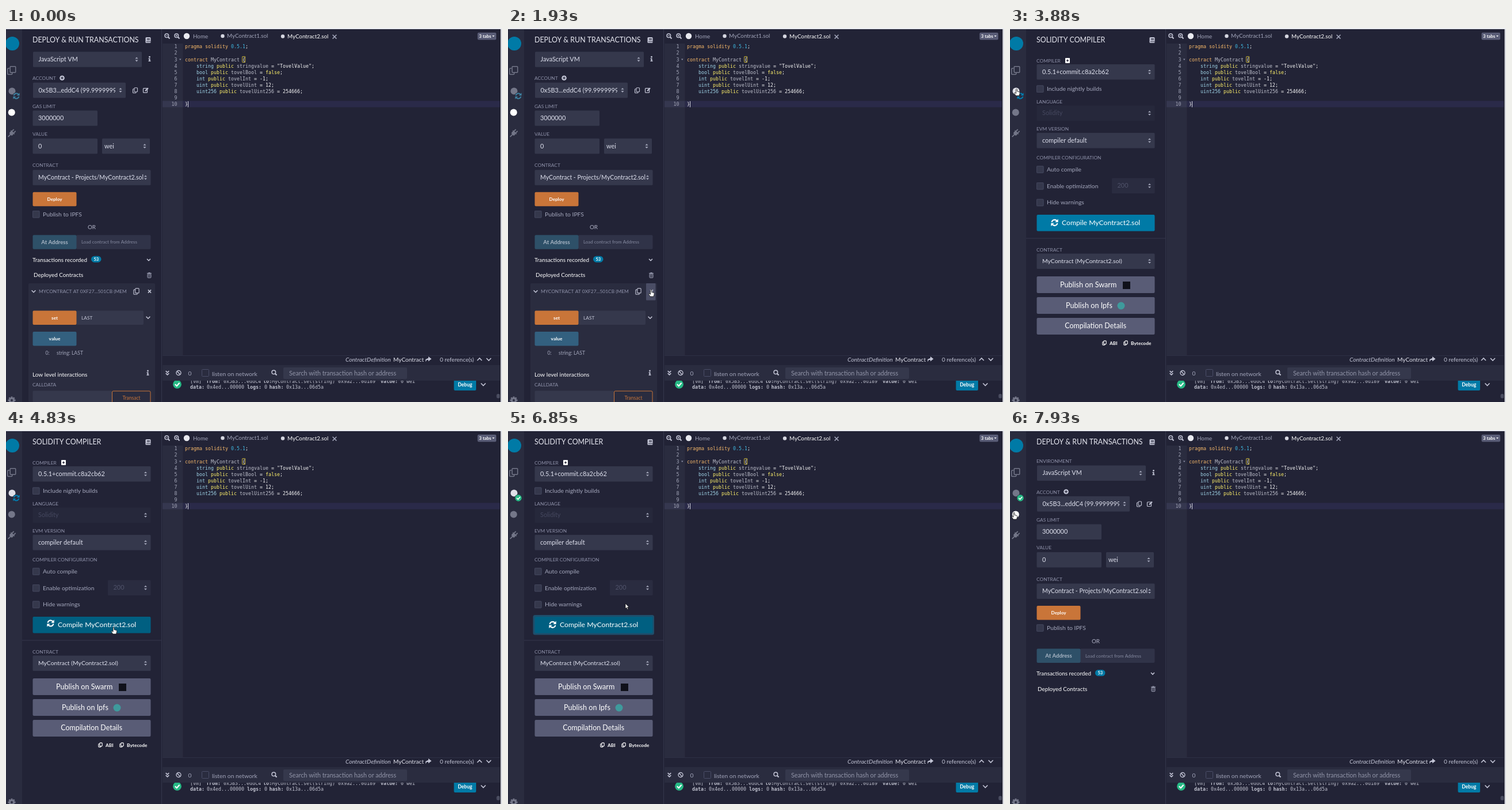
Write an HTML page with a canvas that moves like this. It is 862 px wide and 649 px high and loops after 8 s.

```html
<!DOCTYPE html>
<html lang="en">
<head>
<meta charset="utf-8">
<title>Contract IDE</title>
<style>
html, body { margin: 0; width: 100%; height: 100%; overflow: hidden; background: #222336; }
canvas { display: block; width: 862px; height: 649px; }
</style>
</head>
<body>
<canvas id="stage" width="862" height="649"></canvas>
<script>
const ctx = document.getElementById('stage').getContext('2d');
const LOOP = 8000;
const C = {
  body: '#222336', side: '#2a2c3f', input: '#35384c', dim: '#2a2c40', line: '#34364c',
  text: '#c3c5d6', label: '#8f92aa', soft: '#a2a5ba', white: '#ffffff', gray: '#747789',
  blue: '#007aa6', blueDark: '#005f81', steel: '#33607f', orange: '#c97539',
  violet: '#595c76', green: '#27b985'
};
const SANS = 'Lato, sans-serif';
const MONO = '"DejaVu Sans Mono", monospace';

function rect(x, y, w, h, color, r = 0) {
  ctx.fillStyle = color;
  ctx.beginPath();
  ctx.roundRect(x, y, w, h, r);
  ctx.fill();
}
function outline(x, y, w, h, color, r = 0, width = 1) {
  ctx.strokeStyle = color;
  ctx.lineWidth = width;
  ctx.beginPath();
  ctx.roundRect(x, y, w, h, r);
  ctx.stroke();
}
function disc(x, y, r, color) {
  ctx.fillStyle = color;
  ctx.beginPath();
  ctx.arc(x, y, r, 0, 7);
  ctx.fill();
}
function ring(x, y, r, color, width = 1.2) {
  ctx.strokeStyle = color;
  ctx.lineWidth = width;
  ctx.beginPath();
  ctx.arc(x, y, r, 0, 7);
  ctx.stroke();
}
function path(points, color, width = 1.3) {
  ctx.strokeStyle = color;
  ctx.lineWidth = width;
  ctx.beginPath();
  points.forEach(([x, y]) => ctx.lineTo(x, y));
  ctx.stroke();
}
function poly(points, color) {
  ctx.fillStyle = color;
  ctx.beginPath();
  points.forEach(([x, y]) => ctx.lineTo(x, y));
  ctx.fill();
}
// y is the vertical centre of the capitals
function text(str, x, y, size = 10.9, color = C.text, style = '', align = 'left', family = SANS) {
  ctx.font = `${style} ${size}px ${family}`;
  ctx.textAlign = align;
  ctx.fillStyle = color;
  ctx.fillText(str, x, y + size * 0.36);
}
const label = (str, y) => text(str, 46, y, 8.4, C.label);

function chevron(x, y, dir = 1, color = C.text, s = 3.4) {
  path([[x - s, y - dir * s / 2], [x, y + dir * s / 2], [x + s, y - dir * s / 2]], color, 1.6);
}
function cross(x, y, s = 2.6, color = C.text) {
  path([[x - s, y - s], [x + s, y + s]], color, 1.5);
  path([[x - s, y + s], [x + s, y - s]], color, 1.5);
}
function copyIcon(x, y, color = C.text, s = 1) {
  outline(x - 4 * s, y - 2.5 * s, 5.5 * s, 7 * s, color, 1, 1.1);
  rect(x - 1.8 * s, y - 5 * s, 6.4 * s, 8 * s, C.body);
  outline(x - 1.5 * s, y - 4.5 * s, 5.5 * s, 7 * s, color, 1, 1.1);
}
function infoIcon(x, y) {
  disc(x, y - 3.5, 1.4, C.text);
  rect(x - 1, y - 1, 2, 5, C.text);
  rect(x - 2, y - 1, 2, 1.3, C.text);
  rect(x - 2, y + 3, 4, 1.3, C.text);
}
function trashIcon(x, y, color) {
  rect(x - 4, y - 4, 8, 1.2, color);
  rect(x - 1.7, y - 5, 3.4, 1.2, color);
  outline(x - 3, y - 2.2, 6, 6.4, color, 1, 1);
  path([[x - 1, y - 1], [x - 1, y + 3]], color, 0.8);
  path([[x + 1, y - 1], [x + 1, y + 3]], color, 0.8);
}
function syncIcon(x, y, r, color) {
  ctx.save();
  ctx.translate(x, y);
  for (let i = 0; i < 2; i++) {
    ctx.strokeStyle = color;
    ctx.lineWidth = r * 0.36;
    ctx.beginPath();
    ctx.arc(0, 0, r * 0.8, Math.PI * 1.06, Math.PI * 1.8);
    ctx.stroke();
    poly([[r, -r], [r, -r * 0.12], [r * 0.12, -r * 0.12]], color);
    ctx.rotate(Math.PI);
  }
  ctx.restore();
}
function tick(x, y, r) {
  disc(x, y, r, C.green);
  path([[x - r * 0.5, y], [x - r * 0.1, y + r * 0.4], [x + r * 0.55, y - r * 0.35]], C.white, r * 0.28);
}
function arrows(x, y, color = '#a5a8bb') {
  poly([[x - 2.5, y - 1.2], [x + 2.5, y - 1.2], [x, y - 4]], color);
  poly([[x - 2.5, y + 1.2], [x + 2.5, y + 1.2], [x, y + 4]], color);
}
function field(x, y, w, str, opt = {}) {
  rect(x, y, w, 26.5, opt.bg || C.input, 1.5);
  ctx.save();
  ctx.beginPath();
  ctx.rect(x, y, (opt.clip || w), 27);
  ctx.clip();
  text(str, x + (opt.pad || 9.5), y + 13, opt.size || 10.9, opt.color || '#dfe1ee');
  ctx.restore();
  if (opt.select) arrows(x + w - 9, y + 13.2);
}
function checkbox(y, str) {
  rect(46, y - 6, 12.5, 12.5, C.input, 1);
  outline(46.5, y - 5.5, 11.5, 11.5, '#43465d', 1);
  text(str, 64, y, 10.3, '#a5a8bd');
}
function button(x, y, w, h, str, color, size, tone = C.white) {
  rect(x, y, w, h, color, 2);
  text(str, x + w / 2, y + h / 2, size, tone, 'bold', 'center');
}
function panelTitle(str) {
  text(str, 46, 21, 12.4, '#e6e7f0');
  rect(242.5, 16, 9, 10, C.text, 1.5);
  rect(245, 18, 5, 1, C.body);
  rect(245, 20, 5, 1, C.body);
  rect(244, 23.3, 7.5, 1, C.body);
}

function deployPanel(scrolled, closeHover) {
  panelTitle('DEPLOY & RUN TRANSACTIONS');
  ctx.save();
  ctx.beginPath();
  ctx.rect(28, 39, 242, 610);
  ctx.clip();
  if (scrolled) ctx.translate(0, -20.3);

  label('ENVIRONMENT', 53.5);
  field(47, 61.5, 189, 'JavaScript VM', { select: true });
  infoIcon(249.5, 74);
  label('ACCOUNT', 107.5);
  disc(97.5, 107, 4.3, C.text);
  path([[95, 107], [100, 107]], C.body, 1.2);
  path([[97.5, 104.5], [97.5, 109.5]], C.body, 1.2);
  field(47, 115, 161, '0x5B3...eddC4 (99.9999999', { select: true, clip: 143 });
  copyIcon(224.5, 128.5);
  outline(238.5, 125, 7, 7.5, C.text, 1, 1.2);
  path([[242, 129.5], [247, 124.5]], C.text, 2.2);
  label('GAS LIMIT', 156);
  field(46.5, 163.5, 112.5, '3000000');
  label('VALUE', 204);
  field(46.5, 212, 112.5, '0');
  field(167, 212, 83, 'wei', { select: true, pad: 4 });
  label('CONTRACT', 258.5);
  field(46.5, 266.5, 205, 'MyContract - Projects/MyContract2.sol', { select: true, clip: 194, size: 10.5 });
  button(46.5, 305, 76, 24.5, 'Deploy', C.orange, 8.1);
  checkbox(343.3, 'Publish to IPFS');
  text('OR', 149, 366, 9.9, '#b0b3c6', '', 'center');
  rect(122, 379.5, 129.5, 24.5, '#303348', 2);
  button(46.5, 379.5, 76, 24.5, 'At Address', '#2e5068', 9.5, '#a9b6c5');
  text('Load contract from Address', 131, 391.8, 8, '#858aa0');
  text('Transactions recorded', 46, 422.5, 9.9, C.white);
  rect(148, 416, 17.5, 11, C.blue, 5.5);
  text('53', 156.8, 421.7, 7.6, C.white, 'bold', 'center');
  chevron(248, 422.5, 1, C.text, 3);
  text('Deployed Contracts', 48, 449, 9.9, C.white);
  trashIcon(249, 449.5, C.soft);
  ctx.restore();
  if (scrolled) contractCard(closeHover);
}

function contractCard(closeHover) {
  rect(39, 443, 220, 206, C.side, 2);
  chevron(48, 457);
  text('MYCONTRACT AT 0XF27...501CB (MEM', 57, 457, 8.4, C.label);
  copyIcon(226.5, 457, C.text, 1.15);
  if (closeHover) rect(240, 443, 16.5, 29.5, '#4a4d65', 1);
  cross(249.5, 457);
  rect(122, 490.5, 117, 24.5, C.input, 2);
  button(46.5, 490.5, 76, 24.5, 'set', C.orange, 8.1);
  text('LAST', 131, 502.8, 8.3);
  chevron(247, 502.5);
  button(46.5, 527, 76, 24.5, 'value', C.steel, 8.4);
  text('0:', 68.5, 564.3, 8.6, C.soft);
  text('string: LAST', 88, 564.3, 8.7, C.soft);
  text('Low level interactions', 46, 601.3, 10, C.white);
  infoIcon(246.5, 598.5);
  label('CALLDATA', 619);
  rect(46.5, 629.5, 137.5, 20, C.input, 2);
  outline(184.5, 630, 66.5, 24, C.orange, 2);
  text('Transact', 218, 641.7, 8.5, C.orange, '', 'center');
}

function compilerPanel(hover, focus, spin) {
  panelTitle('SOLIDITY COMPILER');
  label('COMPILER', 56.5);
  rect(96, 52, 8, 9, C.white, 1);
  path([[98, 56.5], [102, 56.5]], C.body);
  path([[100, 54.5], [100, 58.5]], C.body);
  field(46.5, 63, 205, '0.5.1+commit.c8a2cb62', { select: true });
  checkbox(105.5, 'Include nightly builds');
  label('LANGUAGE', 128);
  field(46.5, 134.5, 205, 'Solidity', { select: true, bg: '#26283b', color: '#45485f' });
  label('EVM VERSION', 175);
  field(46.5, 182, 205, 'compiler default', { select: true });
  label('COMPILER CONFIGURATION', 225);
  checkbox(245.3, 'Auto compile');
  checkbox(274, 'Enable optimization');
  field(177, 260.5, 74.5, '200', { select: true, bg: C.dim, color: '#50536a' });
  checkbox(302.7, 'Hide warnings');
  if (focus) rect(43.5, 321, 210.5, 34.5, '#1e4f6c', 3.5);
  rect(46.5, 324, 205, 28.5, hover ? C.blueDark : C.blue, 2);
  ctx.save();
  ctx.translate(77.5, 336.6);
  ctx.rotate(spin);
  syncIcon(0, 1.2, 6.2, C.white);
  ctx.restore();
  text('Compile MyContract2.sol', 90, 338, 12.2, C.white);
  rect(28, 364.5, 242, 1, C.line);
  label('CONTRACT', 385);
  field(46.5, 391.5, 205, 'MyContract (MyContract2.sol)', { select: true, size: 10.4 });
  [431, 467, 503].forEach(y => rect(46.5, y, 205, 29, C.violet, 2));
  text('Publish on Swarm', 87, 445.3, 12.6, C.white);
  rect(196, 440, 13, 13, '#10111a');
  text('Publish on Ipfs', 97, 481.3, 12.6, C.white);
  disc(193, 482, 6.5, '#3f9a9c');
  text('Compilation Details', 148.7, 517, 12.4, C.white, '', 'center');
  copyIcon(164, 546.5, C.white, 0.8);
  text('ABI', 173, 546.8, 8.3, C.white, 'bold');
  copyIcon(201, 546.5, C.white, 0.8);
  text('Bytecode', 210, 546.8, 8.4, C.white, 'bold');
}

function sidebar(compiling, compiled) {
  rect(0, 2, 28, 647, C.side);
  disc(11, 27, 12, C.blue);
  outline(2.7, 70, 8, 10.5, C.gray, 1, 1.5);
  rect(6, 66, 11.5, 12, C.side);
  outline(7.2, 66.7, 9.5, 10.5, C.gray, 1, 1.5);
  disc(10.5, 109.5, 6, compiling ? '#dfe0e8' : C.gray);
  disc(18, 118, 6.3, C.side);
  if (compiled) tick(18, 118, 5.7);
  else syncIcon(18, 118, 5.6, compiling ? '#007db0' : '#3d7f9f');
  disc(9.8, 146.5, 6, compiling ? C.gray : C.white);
  ctx.save();
  ctx.translate(10, 182.5);
  ctx.rotate(Math.PI / 4);
  rect(-4.5, -3, 9, 2, C.gray, 1);
  rect(-3.5, -1.5, 7, 5, C.gray, 2.5);
  rect(-3, -7.5, 1.8, 5, C.gray, 1);
  rect(1.2, -7.5, 1.8, 5, C.gray, 1);
  rect(-0.9, 3, 1.8, 6, C.gray);
  ctx.restore();
  ctx.save();
  ctx.translate(10, 646);
  for (let i = 0; i < 4; i++) {
    rect(-1.5, -6.5, 3, 13, C.gray, 0.5);
    ctx.rotate(Math.PI / 4);
  }
  disc(0, 0, 4.8, C.gray);
  disc(0, 0, 2, C.side);
  ctx.restore();
}

function magnifier(x, y, sign) {
  ring(x - 0.7, y - 0.7, 3.3, C.text, 1.5);
  path([[x + 1.8, y + 1.8], [x + 4.5, y + 4.5]], C.text, 2);
  if (!sign) return;
  path([[x - 2.4, y - 0.7], [x + 1, y - 0.7]], C.text, 1);
  if (sign > 0) path([[x - 0.7, y - 2.4], [x - 0.7, y + 1]], C.text, 1);
}

const SOURCE = [
  'pragma solidity 0.5.1;', '', 'contract MyContract {',
  '    string public stringvalue = "TovelValue";',
  '    bool public tovelBool = false;',
  '    int public tovelInt = -1;',
  '    uint public tovelUint = 12;',
  '    uint256 public tovelUint256 = 254666;', '', '}'
];
const RULES = [
  [/^(pragma|solidity|contract)$/, '#f7b96a'],
  [/^(string|bool|u?int(256)?)$/, '#9fd3e6'],
  [/^(public|false)$/, '#fff16b'],
  [/^0\.5\.1$/, '#3fb8e0'],
  [/^["\d{}=;-]/, '#f4f4f4']
];
function codeLine(str, x, y) {
  for (const m of str.matchAll(/"[^"]*"|[\w.]+|[^\s\w]/g)) {
    const rule = RULES.find(([re]) => re.test(m[0]));
    text(m[0], x + m.index * 5, y, 8.306, rule ? rule[1] : '#bfc1cd', '', 'left', MONO);
  }
}

function editor() {
  rect(270, 2, 1, 647, C.line);
  magnifier(280, 14, -1);
  magnifier(297, 14, 1);
  disc(314, 14, 5.2, '#e9eaf0');
  text('Home', 325, 14, 9.8, C.soft);
  disc(376.5, 14, 3.2, '#d5d6e0');
  text('MyContract1.sol', 384, 13.5, 9.75, C.soft);
  disc(481, 14.5, 3.2, '#d5d6e0');
  text('MyContract2.sol', 489, 14, 9.75, C.white);
  cross(571, 15.2, 3.4, C.soft);
  rect(819.5, 8, 32.5, 12.5, C.violet, 2);
  text('3 tabs', 822, 14.3, 7.8, C.white, 'bold');
  poly([[845, 13], [849, 13], [847, 15.3]], C.white);

  rect(272, 27, 35.5, 541, C.side);
  rect(272, 126.5, 35.5, 11, '#35374f');
  rect(307.5, 126.5, 551, 11, '#2a2a49');
  SOURCE.forEach((str, i) => {
    const y = 32.3 + i * 11.12;
    text(i + 1, 297.5, y, 8.306, '#a3a6b8', '', 'right', MONO);
    codeLine(str, 311, y);
  });
  poly([[301, 53.5], [304.5, 53.5], [302.8, 56]], C.label);
  outline(410.7, 49.5, 5, 10, '#c9b53a', 0.5);
  rect(316, 127, 1, 10.5, '#d8d9e2');

  rect(272, 568, 586.5, 1, '#2d2f44');
  text('ContractDefinition', 590, 575.3, 10.2, C.text, 'italic');
  text('MyContract', 673, 575.3, 10.1, '#e3e4ee');
  poly([[734, 570], [739.5, 574.3], [734, 578.5], [734, 576], [731, 576.2], [729.2, 579.5], [729.2, 575], [734, 572.7]], C.text);
  text('0 reference(s)', 754, 575.3, 10);
  chevron(823, 575, -1, C.text, 4);
  chevron(839, 575, 1, C.text, 4);
}

function terminal() {
  const mono = (str, x, y, style = '') => text(str, x, y, 8.306, '#c0c2cf', style, 'left', MONO);
  const pairs = (list, y) => list.forEach(([str, x, bold]) => mono(str, x, y, bold ? 'bold' : ''));

  ctx.save();
  ctx.beginPath();
  ctx.rect(272, 612, 587, 37);
  ctx.clip();
  pairs([['[vm]', 320], ['from:', 348, 1], ['0x5B3...eddC4', 378], ['to:', 447, 1],
    ['MyContract.set(string)', 462], ['0x9a2...0d189', 577], ['value:', 651, 1], ['0 wei', 686]], 613.5);
  pairs([['data:', 320, 1], ['0x4ed...00000', 349], ['logs:', 419, 1], ['0', 449],
    ['hash:', 457.5, 1], ['0x13a...06d5a', 487]], 623.5);
  tick(297.5, 618.3, 7.4);
  rect(778.5, 606, 38.5, 23, C.blue, 2);
  text('Debug', 797.7, 618.8, 8.5, C.white, 'bold', 'center');
  chevron(829.5, 618.5, 1, C.text, 4);
  rect(852.5, 635, 6, 7.5, '#4a4d60', 2.5);
  ctx.restore();

  rect(272, 585, 587, 27, C.side);
  chevron(280.5, 596.5, 1, C.text, 2.8);
  chevron(280.5, 600.5, 1, C.text, 2.8);
  ring(300, 598.5, 4, C.text, 1.4);
  path([[297.3, 595.8], [302.7, 601.2]], C.text, 1.4);
  text('0', 316.5, 598.8, 10.3, C.soft);
  outline(340.5, 592.5, 12, 12, '#4b4e68', 1);
  text('listen on network', 358, 600.5, 10.3, C.soft);
  magnifier(466, 598, 0);
  rect(482, 589, 215, 20, C.input, 2);
  text('Search with transaction hash or address', 492, 598.8, 10.7, '#9295a9');
}

// time, tip x, tip y
const MOVES = [
  [350, 546, 344], [800, 140, 512], [1150, 300, 492], [1710, 249, 456],
  [1930, 248.5, 454], [2710, 248, 455], [2890, 245, 447], [3050, 243, 443],
  [3490, 10, 99], [3660, 11, 105], [4130, 12, 106], [4670, 187, 342],
  [5310, 187, 342], [6770, 190, 344], [6850, 204, 301], [7620, 7, 143], [8000, 7, 143]
];
const HAND = [[1680, 3000], [3450, 4180], [4600, 6800], [7560, 8000]];
const within = (t, a, b) => t >= a && t < b;

function pointer(t) {
  if (t < MOVES[0][0]) return;
  const i = MOVES.findIndex(m => m[0] > t);
  const [t0, x0, y0] = MOVES[i - 1], [t1, x1, y1] = MOVES[i];
  const k = (t - t0) / (t1 - t0), e = k * k * (3 - 2 * k);
  ctx.save();
  ctx.translate(x0 + (x1 - x0) * e, y0 + (y1 - y0) * e);
  ctx.fillStyle = '#fff';
  ctx.strokeStyle = '#111';
  ctx.lineWidth = 0.8;
  const hand = HAND.some(([a, b]) => within(t, a, b));
  const shape = hand
    ? 'M-1 1Q0 -1 1 1V4.5L5 5.5Q6 6 5.6 8L4.6 12H-1.2L-4 8Q-4 6.5 -2.4 7L-1 8.3Z'
    : 'M0 0V9L2 7.2L3.5 10.4L5 9.7L3.5 6.6H6.3Z';
  const p = new Path2D(shape);
  ctx.fill(p);
  ctx.stroke(p);
  ctx.restore();
}

function draw(t) {
  const compiling = within(t, 3810, 7780);
  rect(0, 0, 862, 649, C.body);
  if (compiling) {
    const tickTime = t < 4990 ? 4830 : t < 5130 ? 4990 : 5130;
    const spin = within(t, 4830, 5310) ? Math.PI * (1 + (tickTime - 4830) / 1000) : 0;
    compilerPanel(within(t, 4600, 6900), t >= 5310, spin);
  } else {
    deployPanel(t < 2710, within(t, 1650, 2710));
  }
  sidebar(compiling, t >= 5600);
  editor();
  terminal();
  rect(0, 0, 862, 2, '#eceef2');
  rect(858.5, 2, 1, 647, '#14151f');
  rect(859.5, 2, 2.5, 647, '#d9dbe0');
  pointer(t);
}

function frame() {
  draw(performance.now() % LOOP);
  requestAnimationFrame(frame);
}
frame();
</script>
</body>
</html>
```
